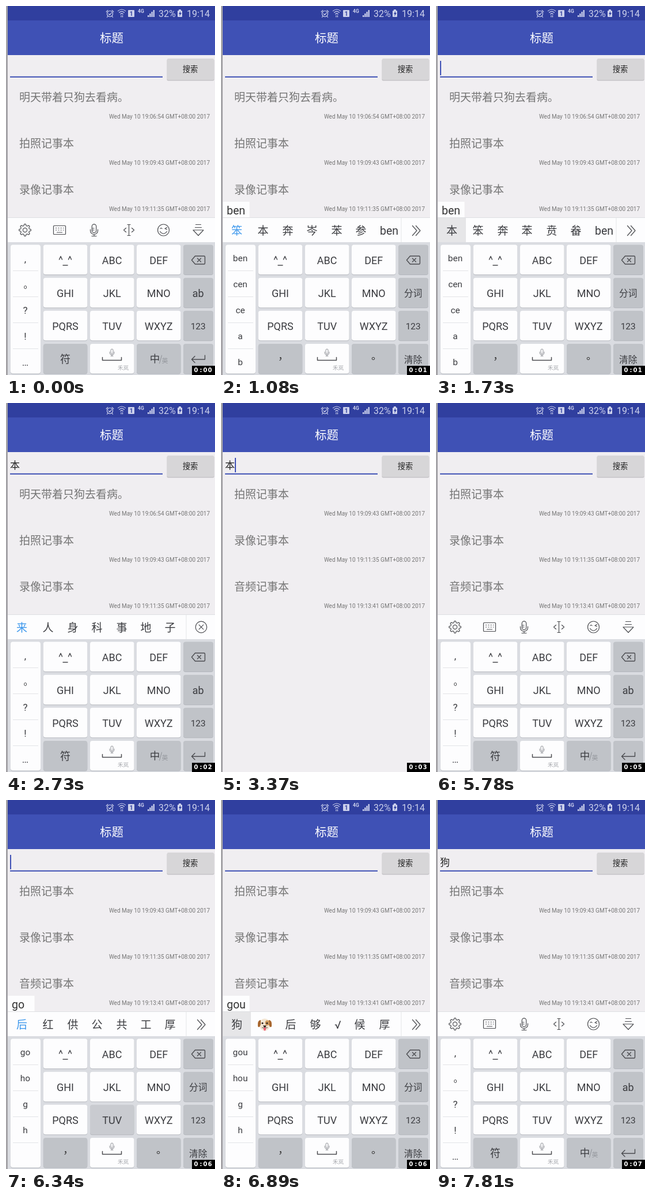
An HTML page that plays this animation: 363 px wide and 639 px high, repeating every 8000 ms.

```html
<!DOCTYPE html>
<html lang="zh-CN">
<head>
<meta charset="utf-8">
<title>记事本搜索</title>
<style>
html, body { margin: 0; width: 100%; height: 100%; overflow: hidden; background: #f0eef1; }
svg { display: block; width: 100vw; height: 100vh; font-family: Roboto, 'Noto Sans CJK SC', 'Noto Sans CJK', sans-serif; }
.icon { fill: none; stroke: #4b4c50; stroke-width: 1.2; stroke-linecap: round; stroke-linejoin: round; }
</style>
</head>
<body>
<svg id="stage" viewBox="0 0 363 639"></svg>
<script>
const LOOP = 8000;
const NOTES = [
  ['明天带着只狗去看病。', '19:06:54'],
  ['拍照记事本', '19:09:43'],
  ['录像记事本', '19:11:35'],
  ['音频记事本', '19:13:41'],
];
const MARKS = [',', '。', '?', '!', '…'];
const SLOTS = [27.5, 73, 116, 158, 201, 243, 285];
const DOG = 'dog';

// Each step changes some fields of the screen state.
const STEPS = [
  [0, { field: '', cursor: 0, first: 0, slide: 0, press: '', popup: '', cands: null, side: MARKS, picked: 0 }],
  [580, { cursor: 1, press: 'ABC', popup: 'a', cands: [...'啊不从才把吃被'], side: ['a', 'b', 'c'] }],
  [710, { press: '' }],
  [830, { press: 'DEF', popup: 'be', cands: [...'车策测册册侧厕'], side: ['ce', 'a', 'b', 'c'] }],
  [950, { press: 'MNO' }],
  [1080, { cursor: 0, press: '', popup: 'ben', cands: [...'笨本奔岑苯参', 'ben'], side: ['ben', 'cen', 'ce', 'a', 'b'] }],
  [1340, { cands: [...'本笨奔苯贲畚', 'ben'] }],
  [1610, { cursor: 1 }],
  [1730, { picked: 1 }],
  [2080, { field: '本', picked: 0, popup: '', cands: [...'来人身科事地子'], side: MARKS }],
  [2730, { cursor: 0 }],
  [3000, { press: '搜索' }],
  [3120, { first: 1, press: '' }],
  [3250, { slide: 130, cands: null, cursor: 1 }],
  [3370, { slide: 280 }],
  [3790, { cursor: 0 }],
  [4070, {}],
  [4350, { cursor: 1 }],
  [4780, { slide: 130 }],
  [4920, { slide: 0 }],
  [5070, {}],
  [5220, { field: '', press: 'del' }],
  [5500, { press: '' }],
  [5780, { cursor: 0 }],
  [6060, { press: 'GHI', popup: 'g', cands: [...'个和好会过还给'], side: ['g', 'h', 'i'] }],
  [6200, { press: 'MNO', popup: 'go', cands: [...'后红供公共工厚'], side: ['go', 'ho', 'g', 'h'] }],
  [6340, { press: 'TUV', cursor: 1 }],
  [6490, { press: '', popup: 'gou', cands: ['狗', DOG, ...'后够√候厚'], side: ['gou', 'hou', 'g', 'h'] }],
  [6890, { cursor: 0, picked: 1 }],
  [7010, {}],
  [7130, { field: '狗', popup: '', picked: 0, cands: [...'狗的粮子是肉年'], side: MARKS }],
  [7260, { cursor: 1 }],
  [7670, { cands: null }],
  [7810, { cursor: 0 }],
];
let acc = {};
const STATES = STEPS.map(([t, change]) => acc = { ...acc, ...change, t });

const rect = (x, y, w, h, fill, r = 0) =>
  `<rect x="${x}" y="${y}" width="${w}" height="${h}" rx="${r}" fill="${fill}"/>`;
// Text placed by its vertical centre.
const text = (s, x, cy, size, fill = '#3b3c40', extra = 'text-anchor="middle"') =>
  `<text x="${x}" y="${cy + size * 0.37}" font-size="${size}" fill="${fill}" ${extra}>${s}</text>`;
const icon = (x, y, d, extra = '') =>
  `<path class="icon" transform="translate(${x} ${y})" d="${d}" ${extra}/>`;
const ring = r => `M${-r} 0a${r} ${r} 0 1 0 ${2 * r} 0a${r} ${r} 0 1 0 ${-2 * r} 0`;
const START = 'text-anchor="start"', END = 'text-anchor="end"';

const gear = 'M' + Array.from({ length: 72 }, (_, i) => {
  const a = i * Math.PI / 36;
  const r = 9 + 1.3 * Math.max(-1, Math.min(1, 2 * Math.cos(8 * a)));
  return (r * Math.sin(a)).toFixed(1) + ' ' + (r * Math.cos(a)).toFixed(1);
}).join('L') + 'Z' + ring(3.6);

function statusBar() {
  const c = '#ccd1ec', line = `style="stroke:${c}"`;
  let out = rect(3, 0, 360, 25, '#303f9f');
  out += icon(180.5, 13.5, ring(5) + 'M-2.3 0L-.3 2L2.6-1.6M-6.3-3.5L-3.6-6.2M6.3-3.5L3.6-6.2M-4 4.5L-5 6M4 4.5L5 6', line);
  out += icon(201, 12, 'M-6.5-3.4Q0-8.6 6.5-3.4M-4.3-.7Q0-4.4 4.3-.7M-2.2 2Q0 0 2.2 2M-1 4.5V7M1.5 4.5V7', line);
  out += rect(212, 7, 11, 12, c, 1) + text(1, 217.5, 13.2, 10, '#303f9f', 'text-anchor="middle" font-weight="700"');
  out += text('4G', 229, 9, 8.5, c, START + ' font-weight="700"');
  for (let i = 0; i < 4; i++) out += rect(246 + i * 3.2, 16 - i * 3, 2.3, 3 + i * 3, c);
  out += text('32%', 265, 13, 16, c, START);
  out += rect(300, 6, 4, 2, c) + rect(298, 8, 8, 11, c, 1);
  out += '<path d="M303 9l-3 5h2l-1 4 4-6h-2z" fill="#303f9f"/>';
  return out + text('19:14', 314, 13, 16.1, c, START);
}

function page(s) {
  let out = rect(0, 0, 363, 639, '#f0eef1') + statusBar();
  out += rect(3, 25, 360, 60, '#3f51b5') + text('标题', 183.5, 55.5, 20.5, '#fff');
  out += rect(7, 121.8, 265, 2, '#3f51b5');
  out += text(s.field, 7, 108, 17, '#222', START);
  if (s.cursor) out += rect(s.field ? 24 : 7, 95, 2, 25, '#3f51b5');
  out += rect(279.5, 92, 82, 37.5, '#c5c4c7', 2);
  out += rect(280, 91, 81, 37, s.press == '搜索' ? '#bbbabd' : '#d7d6d8', 2);
  out += text('搜索', 320, 109.5, 13.3, '#222', 'text-anchor="middle" font-weight="500"');
  NOTES.slice(s.first, s.first + 3).forEach(([title, time], i) => {
    out += text(title, 23, 158 + i * 80.2, 19, '#757575', START);
    out += text(`Wed May 10 ${time} GMT+08:00 2017`, 354, 191.2 + i * 80.2, 10, '#757575', END);
  });
  return out;
}

function dog(x, y) {
  return `<g transform="translate(${x} ${y})">
    <ellipse rx="9.5" ry="10.5" fill="#f3e6d3"/>
    <path d="M-7-8Q-13-8-12 3Q-9 7-7-1ZM7-8Q13-8 12 3Q9 7 7-1Z" fill="#a8672f"/>
    <ellipse cx="4.3" cy="-3" rx="3.8" ry="4.6" fill="#cf9a5d"/>
    <circle cx="-4" cy="-2.5" r="1.6" fill="#33251f"/><circle cx="4" cy="-2.5" r="1.6" fill="#33251f"/>
    <path d="M-2 5H2V9Q0 12-2 9Z" fill="#ee6478"/>
    <path d="M-3 1.5H3Q2 4.5 0 4.5Q-2 4.5-3 1.5Z" fill="#33251f"/>
    <path d="M0 4Q-2 7-5 5M0 4Q2 7 5 5" fill="none" stroke="#33251f" stroke-width=".8"/></g>`;
}

function candidates(s) {
  let out = '';
  if (s.picked) out += rect(3, 367, 49, 42, '#e6e6e8');
  const slots = s.cands.includes(DOG) ? [27.5, 76, 121, 164, 203, 241, 284] : SLOTS;
  s.cands.forEach((c, i) => {
    const x = c == 'ben' ? 292 : slots[i];
    out += c == DOG ? dog(x, 389)
      : text(c, x, 388.5, c == 'ben' ? 19.5 : 19, i || s.picked ? '#3b3c40' : '#3c97ec');
  });
  out += rect(312.5, 367, 1, 42, '#e4e5e8');
  return out + (s.popup
    ? icon(339, 389, 'M-6.5-8.5L1 0L-6.5 8.5M-.5-8.5L7 0L-.5 8.5')
    : icon(339, 388, ring(9.8) + 'M-3.8-3.8L3.8 3.8M3.8-3.8L-3.8 3.8'));
}

function toolbar() {
  return icon(33, 388, gear) +
    icon(93, 388, 'M-9.5-7.5H9.5Q10.5-7.5 10.5-6.5V6.5Q10.5 7.5 9.5 7.5H-9.5Q-10.5 7.5-10.5 6.5V-6.5Q-10.5-7.5-9.5-7.5ZM-4.5 4H4.5') +
    icon(93, 388, 'M-6.5-3.5H7M-6.5 0H7', 'stroke-dasharray="1.2 3.1"') +
    icon(153, 388, 'M-3.7-6.5a3.7 3.7 0 0 1 7.4 0V1a3.7 3.7 0 0 1-7.4 0ZM-6.5-1V1a6.5 6.5 0 0 0 13 0V-1M0 7.5V10.5M-4 10.5H4M-3.5-3H0M-3.5 0H0') +
    icon(213.5, 388, 'M-2.5-9.5H2.5M0-9.5V9.5M-2.5 9.5H2.5M-5-3.5L-9 0L-5 3.5M5-3.5L9 0L5 3.5') +
    icon(273.5, 388, ring(10) + 'M-5.5-2.5Q-4-4.5-2.5-2.5M6-4.5L2.5-2.5L6-1M-6 2.5Q0 10 6 2.5') +
    icon(334, 388, 'M-4.5-9.5H4.5M-5.5-4.5H5.5M-9 0H9L0 9.5Z');
}

function keys(s) {
  const typing = !!s.popup;
  let out = '';
  const key = (x, y, w, h, grey, name) => {
    const fill = s.press == name ? (grey ? '#a4a8ae' : '#c9cbd0') : grey ? '#c0c3c8' : '#fdfdfe';
    out += rect(x, y + 1, w, h, '#b4b7bd', 4) + rect(x, y, w, h, fill, 4);
  };
  const rows = [413.5, 470.7, 527.8, 585];
  const cols = [64.8, 146, 227];
  const names = ['^_^', 'ABC', 'DEF', 'GHI', 'JKL', 'MNO', 'PQRS', 'TUV', 'WXYZ'];

  key(8, 413.5, 52, 223, false, 'side');
  s.side.forEach((w, i) => {
    const cy = 436.5 + i * 45;
    if (i < 4) out += rect(12, 458 + i * 45, 44, 1, '#e3e4e7');
    if (w == '。') out += text(w, 30.5, 482.5, 16, '#3b3c40', START);
    else out += text(w, 33.5, w == ',' ? cy + 1 : cy, s.side == MARKS ? 17 : 15.4);
  });

  names.forEach((n, i) => {
    const x = cols[i % 3], y = rows[i / 3 | 0];
    key(x, y, 76.5, 51.5, false, n);
    if (i) out += text(n, x + 38.2, y + 27, 18);
    else out += icon(103, 440, 'M-10.5-1L-8-6.5L-5.5-1M5.5-1L8-6.5L10.5-1M-4 9H4', 'style="stroke-width:1.5"');
  });

  key(cols[0], rows[3], 76.5, 51.5, true, 'sym');
  out += typing ? text('，', 99, 605.5, 18, '#333', START + ' font-weight="500"') : text('符', 103, 611.5, 18);
  key(cols[1], rows[3], 76.5, 51.5, false, 'space');
  out += icon(184, 600, 'M-2-4a2 2 0 0 1 4 0V0a2 2 0 0 1-4 0ZM-4-1V0a4 4 0 0 0 8 0V-1M0 4V6M-2 6H2', 'style="stroke:#8f9197;stroke-width:1"');
  out += icon(184, 611, 'M-16.5-2.5V2.5H16.5V-2.5', 'style="stroke-width:1.5"');
  out += text('禾岚', 203.5, 626, 9.5, '#a6a8ad');
  key(cols[2], rows[3], 76.5, 51.5, true, 'lang');
  out += typing ? text('。', 261, 605.5, 18, '#333', START + ' font-weight="500"')
    : text('中', 258.5, 611, 17.5) + icon(268.5, 612, 'M-2 7L2-7', 'style="stroke:#8d9096;stroke-width:1"') + text('英', 276, 614, 10.5, '#8d9096');

  ['del', typing ? '分词' : 'ab', '123', typing ? '清除' : 'enter'].forEach((n, i) => {
    const cy = rows[i] + 26.8;
    key(308, rows[i], 52, 51.5, true, n);
    if (n == 'del') out += icon(334, 440, 'M-11.5 0L-5.5-7H10Q11.5-7 11.5-5.5V5.5Q11.5 7 10 7H-5.5ZM-1.5-3L4.5 3M4.5-3L-1.5 3', 'style="stroke-width:1.4"');
    else if (n == 'enter') out += icon(334, 611, 'M11.5-6V1H-11.5M-6-4.5L-11.5 1L-6 6.5', 'style="stroke-width:1.4"');
    else out += text(n, 333.7, cy, n == 'ab' ? 18 : n == '123' ? 15.5 : 15.7);
  });
  return out;
}

function keyboard(s) {
  let out = `<g transform="translate(0 ${s.slide})">`;
  if (s.popup) out += rect(3, 339, 46.5, 27, '#fdfdfe') + text(s.popup, 10, 353.5, 19.5, '#333', START);
  out += rect(3, 366, 360, 43, '#fdfdfe') + rect(3, 366, 360, 1, '#dedfe2');
  out += rect(3, 409, 360, 230, '#dadce1');
  return out + (s.cands ? candidates(s) : toolbar()) + keys(s) + '</g>';
}

function clock(s) {
  return rect(323, 623, 40, 16, '#000') +
    text('0:0' + Math.floor(s.t / 1000), '326.5 336.5 342.5 350.8', 630.7, 10, '#fff',
      `font-weight="700" style="font-family:'DejaVu Sans',sans-serif"`);
}

const stage = document.getElementById('stage');
let shown;
function frame(now) {
  const t = now % LOOP;
  const s = STATES.findLast(s => s.t <= t);
  if (s != shown) {
    shown = s;
    stage.innerHTML = page(s) + (s.slide < 280 ? keyboard(s) : '') + rect(0, 0, 3, 639, '#a5a4a8') + clock(s);
  }
  requestAnimationFrame(() => frame(performance.now() - start));
}
const start = performance.now();
frame(0);
</script>
</body>
</html>
```
